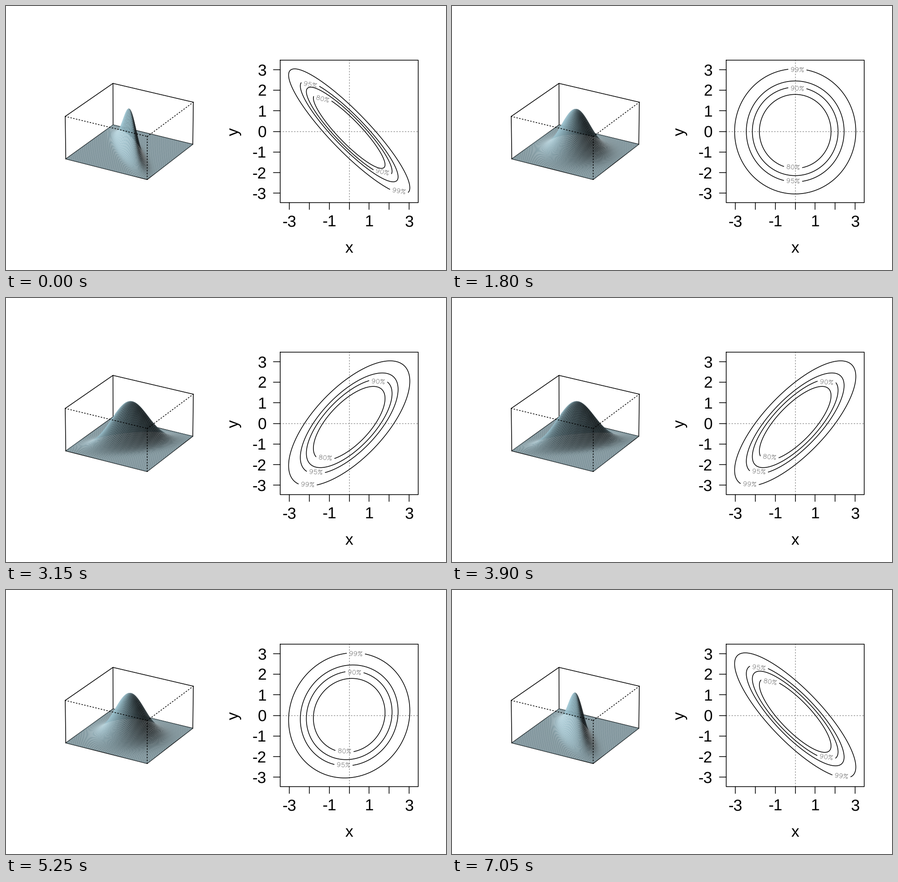
Recreate the animation shown at these times as a matplotlib script. Size 966 by 580 pixels, loop 7.2 s.

```python
import numpy as np
import matplotlib.pyplot as plt
from matplotlib.animation import FuncAnimation
from matplotlib.collections import LineCollection, PolyCollection

W, H, DPI = 966, 580, 100
PX = 72 / DPI                      # points per pixel
FRAMES, STEP = 48, 150
LWD = 1.56
GREY = "#999999"
LIGHT_BLUE = np.array([173, 216, 230]) / 255

plt.rcParams["text.hinting"] = "none"
fig = plt.figure(figsize=(W / DPI, H / DPI), dpi=DPI, facecolor="white")
ax = fig.add_axes([0, 0, 1, 1])
ax.set_xlim(0, W)
ax.set_ylim(H, 0)
ax.axis("off")


def line(pts, color="black", width=LWD, dotted=False, z=2):
    x, y = np.transpose(pts)
    art, = ax.plot(x, y, color=color, lw=width * PX, zorder=z,
                   solid_joinstyle="round", solid_capstyle="round")
    if dotted:
        art.set_linestyle((0, (1, 3)))
        art.set_dash_capstyle("projecting")
    return art


def text(x, y, s, **kw):
    ax.text(x, y, s, family="Liberation Sans", fontsize=35 * PX,
            va="baseline", **kw)


# ---- perspective view -------------------------------------------------
THETA, PHI, EYE = np.radians(30), np.radians(25), 50.1
CELLS, LIM, SHADE = 99, 3.2, 0.75
LIGHT = np.array([-1, 0, 0])


def away(x, y):
    return y * np.cos(THETA) - x * np.sin(THETA)


def project(x, y, z):
    a = x * np.cos(THETA) + y * np.sin(THETA)
    b = away(x, y)
    up = b * np.sin(PHI) + z * np.cos(PHI)
    near = z * np.sin(PHI) - b * np.cos(PHI)
    k = 102.5 / (1 - near / EYE)
    return np.stack([271.6 + a * k, 273.5 - up * k], axis=-1)


def edge(p, q, dotted=False):
    line([project(*p), project(*q)], dotted=dotted, z=4 if dotted else 1)


left, front, right, back = (-1, -1), (1, -1), (1, 1), (-1, 1)
for a, b in ((left, front), (front, right), (right, back), (back, left)):
    edge((*a, -.5), (*b, -.5))
    edge((*a, .5), (*b, .5), dotted=front in (a, b))
    edge((*a, -.5), (*a, .5), dotted=a == front)

g = np.linspace(-1, 1, CELLS + 1)
gx, gy = np.meshgrid(g, g)


def corners(m):
    """Four corners of every cell, shape (cells, 4, ...)."""
    quad = np.stack([m[:-1, :-1], m[:-1, 1:], m[1:, 1:], m[1:, :-1]], axis=2)
    return quad.reshape(CELLS * CELLS, 4, *m.shape[2:])


order = np.argsort(-corners(away(gx, gy)).mean(axis=1))
# Borderless facets: the antialiased seams give the fine mesh
surface = PolyCollection([], antialiased=True, edgecolors="none",
                         linewidths=0, zorder=3)
surface.set_snap(False)
ax.add_collection(surface, autolim=False)


def update_surface(rho):
    x, y = gx * LIM, gy * LIM
    q = (x * x - 2 * rho * x * y + y * y) / (1 - rho * rho)
    gz = np.exp(-q / 2) - .5
    quad = corners(np.stack([gx, gy, gz], axis=-1))[order]
    n = np.cross(quad[:, 2] - quad[:, 0], quad[:, 3] - quad[:, 1])
    n /= np.linalg.norm(n, axis=1, keepdims=True)
    shade = ((1 + n @ LIGHT) / 2) ** SHADE
    surface.set_verts(project(*np.moveaxis(quad, -1, 0)))
    surface.set_facecolor(shade[:, None] * LIGHT_BLUE)


# ---- contour panel ----------------------------------------------------
CENTRE = np.array([753.5, 275.5])
UNIT = np.array([43.85, 45.28])
X0, X1, Y0, Y1 = 602, 905, 119, 432

line([(X0, Y0), (X1, Y0), (X1, Y1), (X0, Y1), (X0, Y0)])
line([(X0, CENTRE[1]), (X1, CENTRE[1])], GREY, dotted=True, z=1)
line([(CENTRE[0], Y1), (CENTRE[0], Y0)], GREY, dotted=True, z=1)
for v in range(-3, 4):
    px, py = CENTRE + UNIT * (v, -v)
    line([(px, Y1), (px, Y1 + 15)])
    line([(X0, py), (X0 - 15, py)])
    text(572, py + 12.5, str(v), ha="right")
    if v % 2:
        text(px, 484.5, str(v), ha="center")
text(753.5, 542, "x", ha="center")
text(509.5, 276, "y", ha="center", rotation=90, rotation_mode="anchor")


def arc(cx, cy, rx, ry, a=0, b=360):
    t = np.radians(np.linspace(a, b, 25))
    return np.column_stack([cx + rx * np.cos(t), cy + ry * np.sin(t)])


# Stroke digits on a 20 x 21 cell
GLYPHS = {
    "0": [arc(10, 10.5, 7, 10.5)],
    "5": [np.vstack([[(15, 21), (5, 21), (4, 12)],
                     arc(10, 7, 7, 7, 140, -155)])],
    "8": [arc(10, 16.5, 6, 4.5), arc(10, 6, 7, 6)],
    "9": [arc(9.5, 14.5, 6.5, 6.5), arc(8.5, 12, 7.5, 12, 12, -130)],
    "%": [np.array([(21, 21), (3, 0)]), arc(6.5, 17.5, 3.5, 3.5),
          arc(17.5, 3.5, 3.5, 3.5),
          np.array([(8, 21), (13, 19), (16, 19), (21, 21)])],
}
LEVELS = (80, 90, 95, 99)
GAP = 41


def strokes(level):
    return [(s + (20 * i - 32, -10.5)) * 0.465
            for i, c in enumerate(f"{level}%") for s in GLYPHS[c]]


LABELS = {level: strokes(level) for level in LEVELS}
curves = {level: line([(0, 0), (0, 0)]) for level in LEVELS}
labels = LineCollection([], colors="#858585", linewidths=0.95 * PX, zorder=3,
                        capstyle="round")
ax.add_collection(labels, autolim=False)


def label_on_top(level, rho):
    """Neighbouring inner levels sit on opposite sides."""
    if level == 99:
        return abs(rho) < 0.56
    top = rho < -0.26 or 0.19 < rho < 0.34
    return top != (level == 90)


def update_contours(rho):
    phi = np.arccos(rho)
    segs = []
    for level in LEVELS:
        r = np.sqrt(-2 * np.log(1 - level / 100))
        scale = r * UNIT * (1, -1)

        def point(t):
            return CENTRE + scale * np.stack([np.cos(t), np.cos(t - phi)], -1)

        mid = phi - (0.11 + 0.26 * max(-rho, 0) ** 6) / r
        if not label_on_top(level, rho):
            mid += np.pi
        slope = -scale * (np.sin(mid), np.sin(mid - phi))
        speed = np.hypot(*slope)
        half = np.arcsin(GAP / 2 / speed)
        path = point(np.linspace(mid + half, mid + 2 * np.pi - half, 300))
        curves[level].set_data(*path.T)

        u = slope / speed * np.sign(slope[0])
        spot = (path[0] + path[-1]) / 2
        basis = np.array([u, (u[1], -u[0])])
        segs += [spot + s @ basis for s in LABELS[level]]
    labels.set_segments(segs)


def update(i):
    rho = 0.9 - 0.075 * abs(i - FRAMES // 2)
    update_surface(rho)
    update_contours(rho)
    return surface, labels, *curves.values()


anim = FuncAnimation(fig, update, frames=FRAMES, interval=STEP,
                     repeat=True, repeat_delay=0, blit=False)
plt.show()
```
